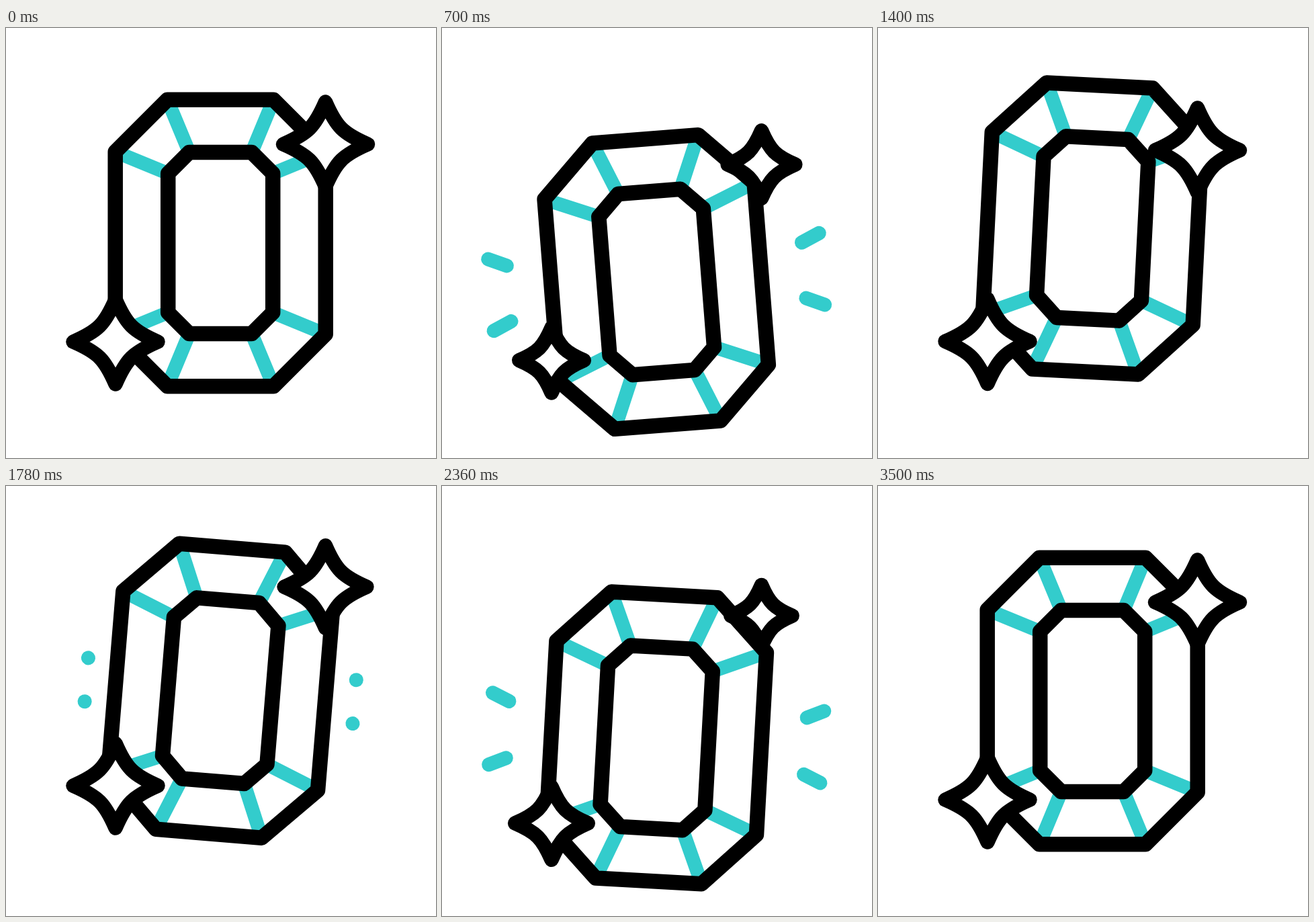
Write an HTML page with a canvas that moves like this. It is 640 px wide and 640 px high and loops after 3.6 s.

```html
<!DOCTYPE html>
<html lang="en">
<head>
<meta charset="utf-8">
<title>Sparkling gem</title>
<style>
  html, body { margin: 0; width: 100%; height: 100%; overflow: hidden; background: #fff; }
  canvas { display: block; width: 100vmin; height: 100vmin; }
</style>
</head>
<body>
<canvas id="stage" width="640" height="640"></canvas>
<script>
const ctx = document.getElementById('stage').getContext('2d');
const LOOP = 3600, BLACK = '#000', CYAN = '#33cccc';

// Eased 0..1 ramp from one time to another.
function ramp(t, from, to) {
  const u = Math.min(1, Math.max(0, (t - from) / (to - from)));
  return u * u * (3 - 2 * u);
}

// Drop, short rest, hop above the resting place, drop again, settle.
const bounce = (t, first, top, second) =>
  first * ramp(t, 0, 705) + (top - first) * ramp(t, 833, 1580) +
  (second - top) * ramp(t, 1580, 2255) - second * ramp(t, 2255, 3075);

const tilt = t => -4.5 * ramp(t, 0, 700) + 9.2 * ramp(t, 900, 1600) - 4.7 * ramp(t, 1940, 3040);

const dip = (t, from, low, to, depth) => depth * (ramp(t, from, low) - ramp(t, low, to));

// Stars follow the bounce late, at their own pace.
const stars = [
  { x: 475.5, y: 173,
    shift: t => bounce((t - 240) / .965, 40, -23, 21),
    size: t => 1 - dip(t, 0, 650, 1040, .21) - dip(t, 1650, 2350, 3070, .275) },
  { x: 163, y: 467,
    shift: t => bounce((t - 280) / .89, 37, -25, 36),
    size: t => 1 - dip(t, 0, 480, 1330, .28) - dip(t, 1850, 2780, 3400, .24) }
];

function octagon(w, h, cut) {
  return [[-w + cut, -h], [w - cut, -h], [w, -h + cut], [w, h - cut],
          [w - cut, h], [-w + cut, h], [-w, h - cut], [-w, -h + cut]];
}
const outer = octagon(156.5, 213.3, 77.5), inner = octagon(78, 135, 31.5);

function stroke(points, color, width, closed) {
  ctx.beginPath();
  points.forEach(p => ctx.lineTo(...p));
  if (closed) ctx.closePath();
  ctx.strokeStyle = color;
  ctx.lineWidth = width;
  ctx.stroke();
}

// Four rays shoot out, then shrink away from the gem.
function drawRays(age) {
  const time = 400;
  if (age < 0 || age >= 2 * time) return;
  const head = ramp(age, 0, time) + .001, tail = ramp(age, time, 2 * time);
  for (const sx of [-1, 1]) for (const sy of [-1, 1]) {
    const at = k => [sx * (200 + 47 * k), sy * (32.5 + 21 * k)];
    stroke([at(tail), at(head)], CYAN, 21);
  }
}

function drawGem(t) {
  ctx.save();
  ctx.translate(319.2, 320 + bounce(t, 58, -35, 57.5));
  ctx.rotate(tilt(t) * Math.PI / 180);
  drawRays(t - 120);
  drawRays(t - 1770);
  outer.forEach((p, i) => stroke([p, inner[i]], CYAN, 20.5));
  stroke(outer, BLACK, 22.5, true);
  stroke(inner, BLACK, 22.5, true);
  ctx.restore();
}

function drawStar({ x, y, shift, size }, t) {
  const scale = size(t);
  ctx.save();
  ctx.translate(x, y + shift(t));
  ctx.save();
  ctx.scale(scale, scale);
  ctx.beginPath();
  ctx.moveTo(0, -63);
  for (let i = 0; i < 4; i++) {
    ctx.bezierCurveTo(16, -26, 26, -16, 63, 0);
    ctx.rotate(Math.PI / 2);
  }
  ctx.closePath();
  ctx.restore();
  ctx.fillStyle = '#fff';
  ctx.fill();
  ctx.strokeStyle = BLACK;
  ctx.lineWidth = 21.5;
  ctx.stroke();
  ctx.restore();
}

function draw(t) {
  ctx.fillStyle = '#fff';
  ctx.fillRect(0, 0, 640, 640);
  ctx.lineCap = ctx.lineJoin = 'round';
  drawGem(t);
  stars.forEach(star => drawStar(star, t));
}

const begin = performance.now();
(function frame() {
  draw((performance.now() - begin) % LOOP);
  requestAnimationFrame(frame);
})();
</script>
</body>
</html>
```
